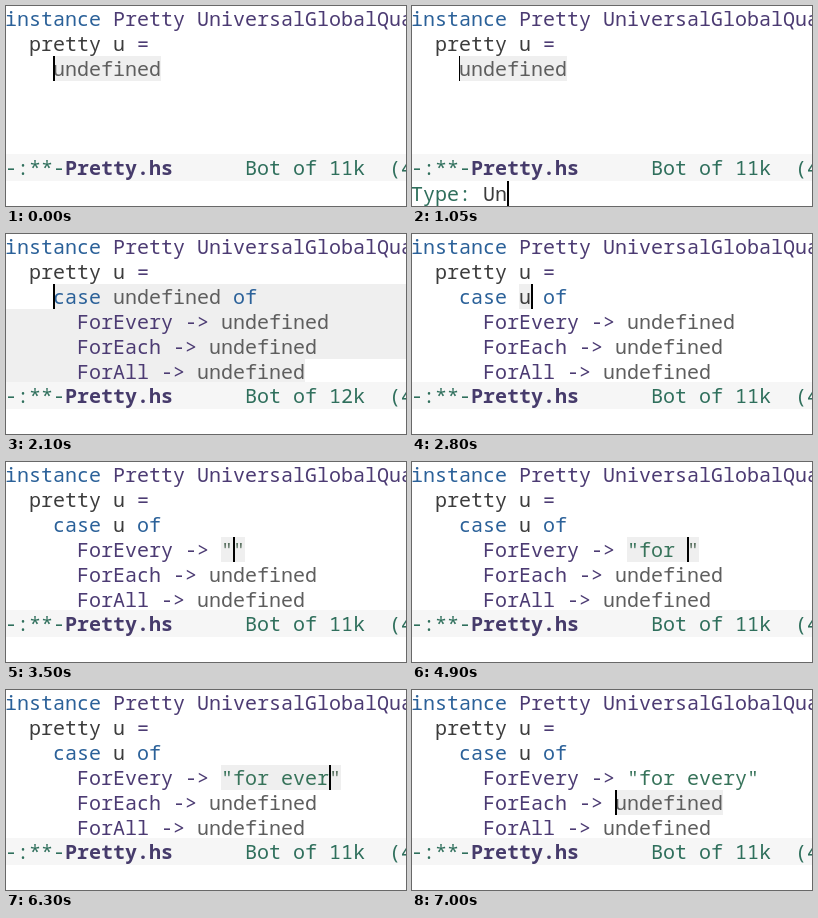
An HTML page for the animation above (7.7 s loop, 400x200 px).

```html
<!DOCTYPE html>
<html lang="en">
<head>
<meta charset="utf-8">
<style>
  html, body { margin: 0; width: 100%; height: 100%; overflow: hidden; background: #fff; }
  svg { display: block; width: 400px; height: 200px; }
  text { font: 20px "Noto Sans Mono", "DejaVu Sans Mono", monospace; white-space: pre; fill: #3c3c3c; }
  .keyword { fill: #2b6199; }
  .type { fill: #4c3b73; }
  .hole { fill: #5e5e5e; }
  .string { fill: #37735a; }
  .quote { fill: #58705f; }
  .mode { fill: #2f6f5c; }
  .file { fill: #463b6b; font-weight: bold; }
</style>
</head>
<body>
<svg id="stage" viewBox="0 0 400 200"></svg>
<script>
const STEP = 350, LOOP = 7700, LAST_STEP = 20;
const CELL = 12, ROW = 25, LEFT = -1;
const MODE_ROW = 5.96, PROMPT_ROW = 7;
const stage = document.getElementById('stage');
const typeName = 'UniversalGlobalQuantor';

const rect = (x, y, w, h, fill) =>
  `<rect x="${x}" y="${y}" width="${w}" height="${h}" fill="${fill}"/>`;

const highlight = (col, row, length) =>
  rect(LEFT + col * CELL, row * ROW, length * CELL, ROW, '#efefef');

const cursor = (col, row, width = 2) =>
  rect(LEFT + col * CELL, row * ROW, width, ROW, '#000');

// Each run is [class, string]; runs follow one another on the character grid.
function line(row, col, ...runs) {
  return runs.map(([style, string]) => {
    const x = LEFT + col * CELL;
    col += string.length;
    return `<text class="${style}" x="${x}" y="${row * ROW + 20}">${string.replace(/>/g, '&gt;')}</text>`;
  }).join('');
}

const hole = ['hole', 'undefined'];

function prompt(step) {
  const typed = step === 5 ? typeName : typeName.slice(0, step - 1);
  return line(PROMPT_ROW, 0, ['mode', 'Type: '], ['', typed]) +
    cursor(6 + typed.length, PROMPT_ROW);
}

function stringRuns(step) {
  if (step < 10) return [hole];
  const content = 'for every'.slice(0, step - 10);
  const done = step === LAST_STEP;
  return [[content ? 'string' : 'quote', '"'], ['string', content], [done ? 'string' : 'quote', '"']];
}

function caseBlock(step) {
  return line(2, 4, ['keyword', 'case '], step < 8 ? hole : ['', 'u'], ['keyword', ' of']) +
    line(3, 6, ['type', 'ForEvery -> '], ...stringRuns(step)) +
    line(4, 6, ['type', 'ForEach -> '], hole) +
    line(5, 6, ['type', 'ForAll -> '], hole);
}

// Returns the shaded region and the cursor of the editing buffer.
function selection(step) {
  if (step < 6) return [highlight(4, 2, 9), cursor(4, 2, step ? 1 : 2)];
  if (step === 6) return [
    highlight(4, 2, 40) + highlight(0, 3, 40) + highlight(0, 4, 40) + highlight(0, 5, 25),
    cursor(4, 2)
  ];
  if (step === 7) return [highlight(9, 2, 9), cursor(9, 2)];
  if (step === 8) return [highlight(9, 2, 1), cursor(10, 2)];
  if (step === 9) return [highlight(18, 3, 9), cursor(18, 3)];
  if (step < LAST_STEP) return [highlight(18, 3, step - 8), cursor(step + 9, 3)];
  return [highlight(17, 4, 9), cursor(17, 4)];
}

function draw(step) {
  const [shade, caret] = selection(step);
  const size = step === 6 || step === 7 ? '12k' : '11k';
  return shade + rect(0, 148, 400, 27, '#f6f6f6') +
    line(0, 0, ['keyword', 'instance'], ['type', ' Pretty ' + typeName]) +
    line(1, 2, ['', 'pretty u '], ['type', '=']) +
    (step < 6 ? line(2, 4, hole) : caseBlock(step)) +
    line(MODE_ROW, 0, ['mode', '-:**-'], ['file', 'Pretty.hs'], ['mode', `      Bot of ${size}  (4`]) +
    (step > 0 && step < 6 ? prompt(step) : '') + caret;
}

let shown = -1;
function tick() {
  const step = Math.min(LAST_STEP, Math.floor(performance.now() % LOOP / STEP));
  if (step !== shown) stage.innerHTML = draw(shown = step);
  requestAnimationFrame(tick);
}
tick();
</script>
</body>
</html>
```
